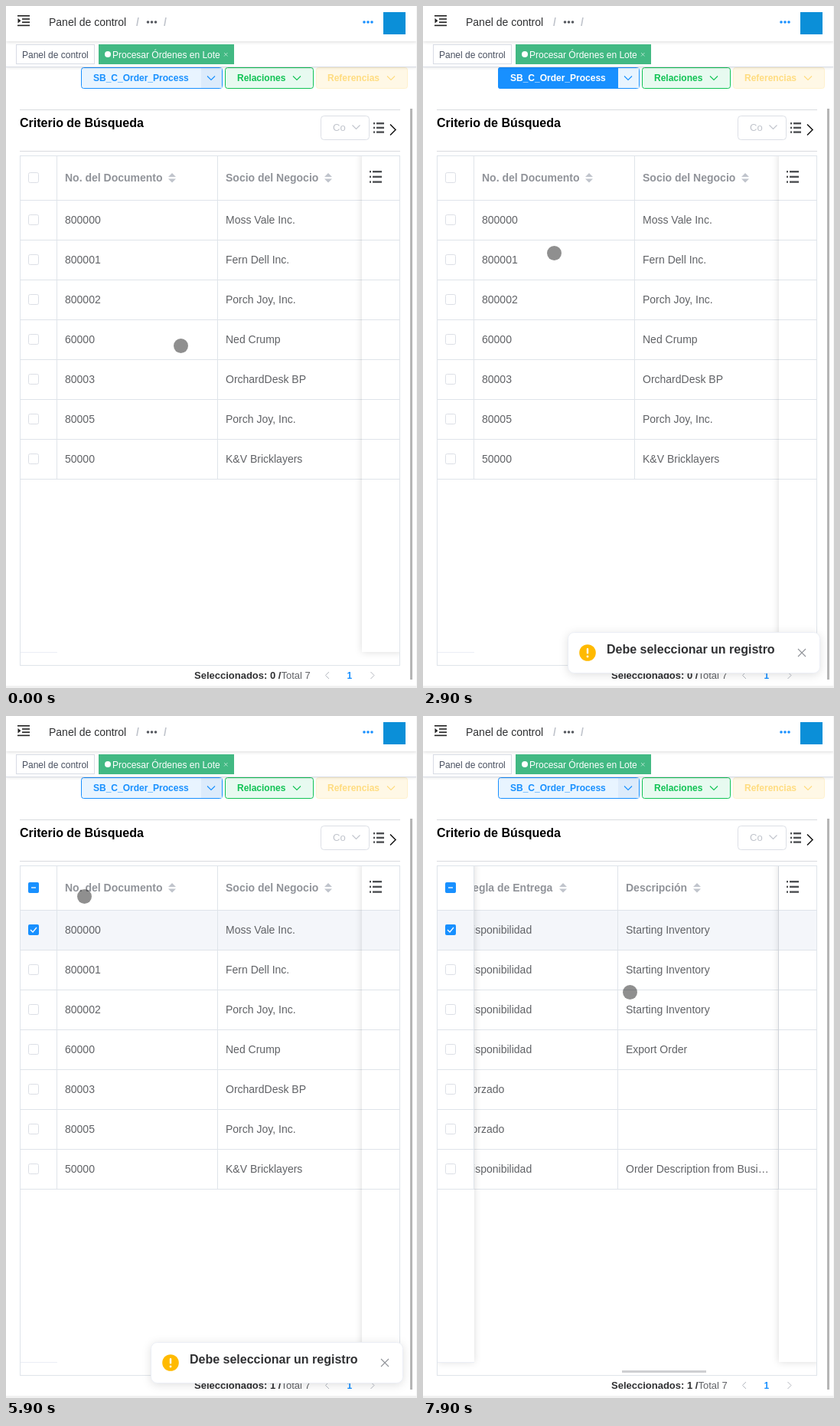
Write an HTML page that moves like this. It is 537x890 px and loops after 8 s.

```html
<!DOCTYPE html>
<html lang="es">
<head>
<meta charset="utf-8">
<title>Procesar Órdenes en Lote</title>
<style>
  html, body { margin: 0; width: 100%; height: 100%; overflow: hidden; background: #fff; }
  svg { display: block; font-family: "Liberation Sans", Arial, sans-serif; }
  text { white-space: pre; }
  .bold { font-weight: bold; }
  .soft { filter: drop-shadow(0 0 5px rgba(0, 0, 0, .14)); }
  .card { filter: drop-shadow(0 2px 6px rgba(0, 0, 0, .12)); }
  .bar { filter: drop-shadow(0 1px 2px rgba(0, 0, 0, .14)); }
</style>
</head>
<body>
<svg id="stage" width="537" height="890" viewBox="0 0 537 890"></svg>
<script>
const LOOP = 8000, STEP = 100;
const BLUE = '#1890ff', GREEN = '#10c354', LINE = '#dfe4ea', GREY = '#909399', INK = '#606266', PALE = '#c0c4cc';
const SCROLL_END = 1072, COL = 210, ROW = 52;

const columns = [
  ['No. del Documento', 127, ['800000', '800001', '800002', '60000', '80003', '80005', '50000']],
  ['Socio del Negocio', 121, ['Moss Vale Inc.', 'Fern Dell Inc.', 'Porch Joy, Inc.', 'Ned Crump', 'OrchardDesk BP', 'Porch Joy, Inc.', 'K&amp;V Bricklayers']],
  ['Fecha de la Orden', 120, Array(7).fill('2020-08-14')],
  ['Total General', 91, Array(7).fill('0,00')],
  ['Estado del Documento', 148, Array(7).fill('Borrador')],
  ['Regla de Entrega', 115, [0, 0, 0, 0, 1, 1, 0].map(forced => forced ? 'Forzado' : 'Disponibilidad')],
  ['Descripción', 80, ['Starting Inventory', 'Starting Inventory', 'Starting Inventory', 'Export Order', '', '', 'Order Description from Busi…']]
];

const rect = (x, y, w, h, fill, extra = '') =>
  `<rect x="${x}" y="${y}" width="${w}" height="${h}" fill="${fill}" ${extra}/>`;
const box = (x, y, w, h, fill, stroke, r = 3, extra = '') =>
  rect(x + .5, y + .5, w - 1, h - 1, fill, `stroke="${stroke}" rx="${r}" ${extra}`);
const text = (x, y, size, fill, value, bold = false, extra = '') =>
  `<text x="${x}" y="${y}" font-size="${size}" fill="${fill}" ${bold ? 'class="bold"' : ''} ${extra}>${value}</text>`;
const line = (d, stroke, width = 1, extra = '') =>
  `<path d="${d}" fill="none" stroke="${stroke}" stroke-width="${width}" ${extra}/>`;
const disc = (x, y, r, fill) => `<circle cx="${x}" cy="${y}" r="${r}" fill="${fill}"/>`;
const down = (x, y, color) => line(`M${x} ${y}l5 5 5-5`, color, 1.1);
const dots = (x, y, color) => [0, 5, 10].map(dx => disc(x + dx, y, 1.8, color)).join('');
const rowY = i => 254 + ROW * i;
const rows = make => Array.from({ length: 7 }, (_, i) => make(i)).join('');

const listIcon = (x, y, w, gap) => [0, 1, 2].map(i =>
  rect(x, y + i * gap, 2, 2.4, '#4d4f52') + rect(x + 4, y + i * gap, w - 4, 2.4, '#4d4f52')).join('');

const sortIcon = x =>
  `<path d="M${x} 223l5-5 5 5zM${x} 225.5h10l-5 5z" fill="${PALE}"/>`;

const checkbox = y => box(29, y, 14, 14, '#fff', '#dcdfe6', 2);
const checkedBox = (y, mark) => rect(29, y, 14, 14, BLUE, 'rx="2"') + line(mark, '#fff', 1.3);

function header() {
  return rect(0, 46, 537, 33, '#fff', 'class="bar"') + rect(0, 0, 537, 46, '#fff', 'class="bar"') +
    rect(0, 79, 537, 1, '#d8dce5') +
    [[15, 12, 16], [21, 16.2, 10], [21, 20.4, 10], [15, 24.6, 16]].map(([x, y, w]) => rect(x, y, w, 1.6, '#222')).join('') +
    '<path d="M15.5 16l4 3.2-4 3.2z" fill="#222"/>' +
    text(56, 26, 14, '#303133', 'Panel de control') +
    text(170, 26, 14, PALE, '/', true) + dots(185.5, 21, '#55585e') + text(206, 26, 14, PALE, '/', true) +
    dots(468, 21, BLUE) + rect(493, 8, 29, 29, '#0b8fd8') +
    box(13, 50, 103, 26, '#fff', '#d8dce5', 0) + text(21, 68, 12, '#495060', 'Panel de control') +
    rect(121, 50, 177, 26, '#42b983') + disc(133, 63, 4, '#fff') +
    text(139, 68, 12, '#fff', 'Procesar Órdenes en Lote') +
    line('M285 61l4.5 4.5M289.500 61l-4.500 4.500', '#b9e6d2', .9);
}

function toolbar() {
  return box(98, 80, 185, 28, '#e8f4ff', BLUE) + rect(255, 81, 27, 26, '#dcebfb') +
    '<g id="active">' + rect(98, 80, 156.5, 28, BLUE, 'rx="3"') + rect(248, 80, 7, 28, BLUE) +
    rect(255, 81, 27, 26, '#e8f4ff') + '</g>' +
    text(114, 98, 12, BLUE, 'SB_C_Order_Process', true, 'id="process"') + down(263, 91.5, BLUE) +
    box(286, 80, 116, 28, '#e7faf0', GREEN) + text(302, 98, 12, GREEN, 'Relaciones', true) + down(375, 91.5, GREEN) +
    box(405, 80, 120, 28, '#fff8e6', '#fff1cc') + text(420, 98, 12, '#ffdc80', 'Referencias', true) + down(498, 91.5, '#ffdc80') +
    rect(18, 135, 497, 1, '#d9dbdf') + rect(18, 189, 497, 1, '#d9dbdf') +
    text(18, 158, 16, '#000', 'Criterio de Búsqueda', true) +
    box(411, 143, 64, 32, '#fff', '#dcdfe6', 4) + text(427, 163, 13, PALE, 'Co') + down(452.5, 155.5, PALE) +
    listIcon(480, 152, 14, 5.7) + line('M502 154.500l7 7-7 7', '#111', 1.5);
}

function column([title, width, cells], i) {
  const x = 67 + COL * i;
  return text(x + 10, 229, 14, GREY, title, true) + sortIcon(x + 18 + width) +
    rect(x + COL - 1, 196, 1, 422, LINE) +
    rows(r => text(x + 10, rowY(r) + 30, 14, INK, cells[r]));
}

function table() {
  const rules = (x, w) => rect(x, 253, w, 1, LINE) + rows(i => rect(x, rowY(i) + 51, w, 1, LINE));
  const tint = (x, w) => rect(x, 254, w, 51, '#f4f6fa', 'class="selected"');
  return '<clipPath id="body"><rect x="67" y="196" width="447" height="660"/></clipPath>' +
    '<clipPath id="frame"><rect x="19" y="196" width="495" height="664"/></clipPath>' +
    rect(18, 195, 497, 1, LINE) + rect(18, 195, 1, 666, LINE) + rect(514, 195, 1, 666, LINE) + rect(18, 860, 497, 1, LINE) +
    tint(19, 495) + rules(19, 495) +
    '<g clip-path="url(#body)"><g id="cells">' + columns.map(column).join('') + '</g></g>' +
    '<g clip-path="url(#frame)">' + rect(19, 190, 48, 653, '#fff', 'id="leftShadow" class="soft"') +
    rect(19, 196, 48, 647, '#fff') + tint(19, 48) + rules(19, 48) +
    rect(66, 196, 1, 422, LINE) + rect(19, 843, 48, 1, '#ebeef5') +
    rect(465, 190, 55, 653, '#fff', 'class="soft"') + tint(465, 49) + rules(465, 49) + '</g>' +
    listIcon(475, 215, 16, 6.7) + checkbox(217) + rows(i => checkbox(rowY(i) + 18)) +
    '<g id="checks">' + checkedBox(217, 'M33 224h6') + checkedBox(272, 'M32 279l3 3 5-6') + '</g>' +
    rect(260, 854, 110, 3, '#b4b6ba', 'id="thumb"');
}

function footer() {
  return text(246, 878, 13, '#303133', '', true, 'id="count"') + text(359.5, 878, 13, INK, 'Total 7') +
    line('M422 869l-4.500 4.500 4.500 4.500', '#b4b8c0') + text(445.5, 878, 12, BLUE, '1', true) +
    line('M476.500 869l4.500 4.500-4.500 4.500', '#b4b8c0') +
    rect(528, 134, 3, 745, '#b5b5b5') + rect(536, 0, 1, 890, '#f3f3f3') + rect(0, 887, 537, 3, '#f1f1f1');
}

function notice() {
  return '<g id="notice">' + box(189, 817, 330, 54, '#fff', '#ebeef5', 8, 'class="card"') +
    disc(215, 844, 10.8, '#ffba00') + rect(213.8, 838, 2.4, 7.5, '#fff', 'rx="1"') + disc(215, 849, 1.4, '#fff') +
    text(240, 845, 16, '#303133', 'Debe seleccionar un registro', true) +
    line('M490 839l10 10M500 839l-10 10', GREY, 1.1) + '</g>';
}

const stage = document.getElementById('stage');
stage.innerHTML = toolbar() + header() + table() + footer() + notice() +
  '<g id="pointer"><circle r="9.5" fill="#000" fill-opacity=".44"/>' +
  '<circle id="ring" r="10.5" fill="none" stroke="#9dbcd8" stroke-opacity=".85" stroke-width="1.6"/></g>';
const get = id => document.getElementById(id);
const set = (id, name, value) => get(id).setAttribute(name, value);
const selected = [...document.querySelectorAll('.selected')];

// time, x, y
const pointerPath = [
  [0, 228.5, 443.5], [400, 228.5, 443.5], [500, 245, 422], [600, 284, 355], [700, 304, 268], [800, 286, 180],
  [900, 248, 118], [1000, 223.5, 94.5], [2000, 223.5, 94.5], [2200, 225, 318], [2300, 262, 472], [2400, 288, 366],
  [2800, 288, 366], [2900, 171.5, 322.5], [3400, 171.5, 322.5], [3800, 95, 281], [4000, 62, 262], [4200, 55.5, 267.5],
  [4500, 55.5, 267.5], [4900, 45, 291], [5100, 35, 287], [5300, 36, 280], [5700, 36, 280], [5900, 102.5, 235.5],
  [6400, 274, 266], [6500, 267, 312], [6600, 270.5, 360.5], [LOOP, 270.5, 360.5]
];
const scrollPath = [[0, 0], [7100, 0], [7200, 80], [7300, 470], [7400, 850], [7500, SCROLL_END], [LOOP, SCROLL_END]];

const clamp = v => Math.max(0, Math.min(1, v));
function along(path, t) {
  const next = Math.max(1, path.findIndex(key => key[0] > t));
  const [t0, ...from] = path[next - 1], [t1, ...to] = path[next];
  return from.map((v, i) => v + (to[i] - v) * (t - t0) / (t1 - t0));
}

function draw(t) {
  const [x, y] = along(pointerPath, t), [scroll] = along(scrollPath, t);
  const isActive = t >= 1400 && t < 5600, isChecked = t >= 5600;
  const pressed = (t >= 1400 && t < 1900) || (t >= 5600 && t < 5800);

  set('pointer', 'transform', `translate(${x} ${y})`);
  set('ring', 'opacity', +pressed);
  set('active', 'opacity', +isActive);
  set('process', 'fill', isActive ? '#fff' : BLUE);
  set('checks', 'opacity', +isChecked);
  selected.forEach(tint => tint.setAttribute('opacity', clamp((t - 5500) / 300)));
  get('count').textContent = `Seleccionados: ${+isChecked} /`;

  const slide = 348 * (1 - clamp((t - 1400) / 300)) ** 2;
  set('notice', 'transform', `translate(${slide} 0)`);
  set('notice', 'opacity', t < 1400 ? 0 : 1 - clamp((t - 5900) / 300));

  set('cells', 'transform', `translate(${-scroll} 0)`);
  set('leftShadow', 'opacity', +(scroll > 0));
  set('thumb', 'x', 19 + 241 * scroll / SCROLL_END);
  set('thumb', 'opacity', scroll === 0 ? 0 : t < 7900 ? 1 : .65);
}

const start = performance.now();
function tick() {
  const t = (performance.now() - start) % LOOP;
  draw(Math.floor(t / STEP) * STEP);
  requestAnimationFrame(tick);
}
tick();
</script>
</body>
</html>
```
